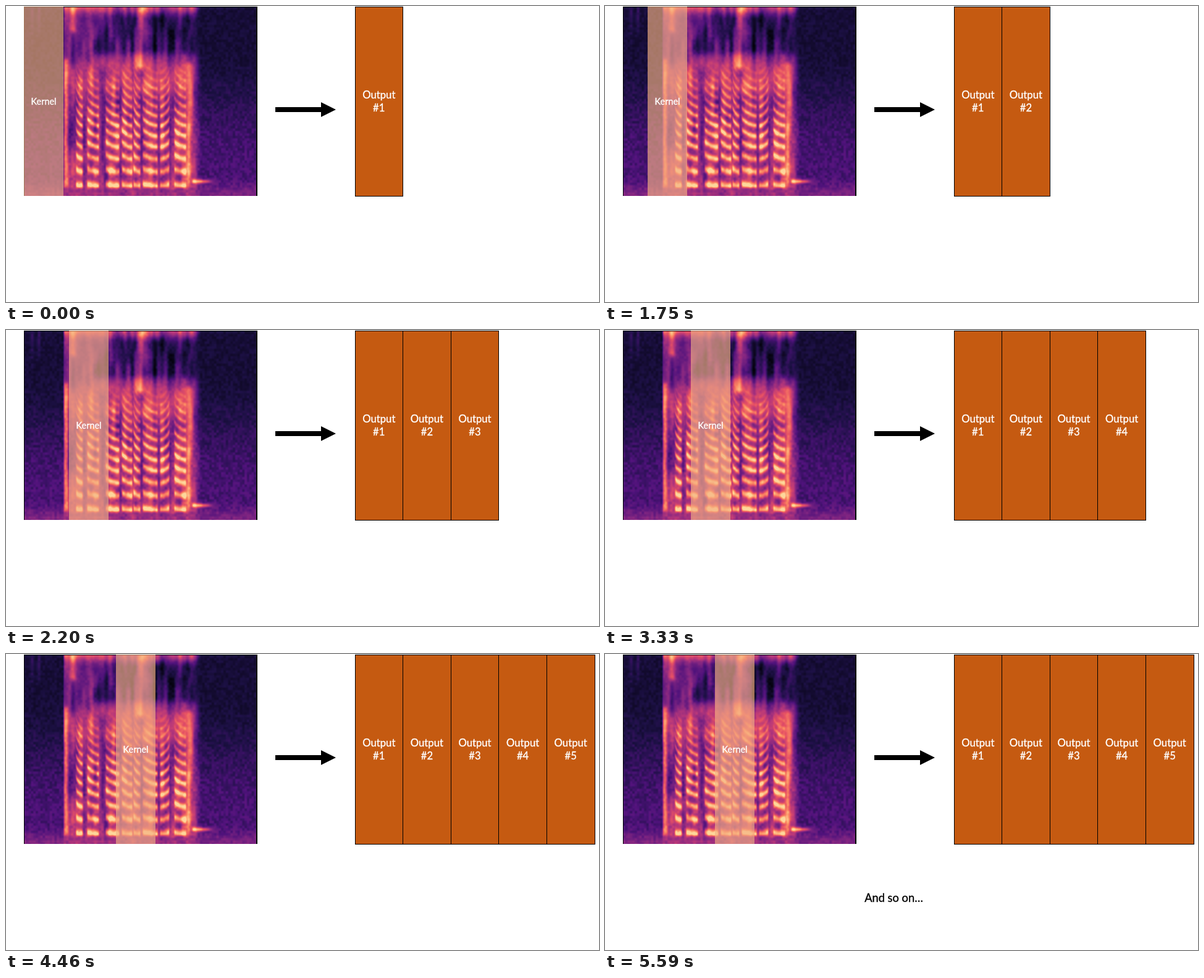
An HTML page with a canvas that plays this animation: 960x480 px, repeating every 6.72 s.

```html
<!DOCTYPE html>
<html lang="en">
<head>
<meta charset="utf-8">
<title>Sliding kernel</title>
<style>
html, body { margin: 0; width: 100%; height: 100%; overflow: hidden; background: #fff; }
canvas { display: block; }
</style>
</head>
<body>
<canvas id="stage" width="960" height="480"></canvas>
<script>
const ctx = document.getElementById('stage').getContext('2d');
const STEP_MS = 1130, FIRST_MS = 1070, LOOP = FIRST_MS + 5 * STEP_MS;
const KERNEL_X = [29, 69, 102, 139, 178];
const BOX = { x: 565, y: 1, h: 308, step: 77.6 };
const SPEC = { x: 29, y: 1, w: 378, h: 307 };

const clamp = v => Math.max(0, Math.min(1, v));
const smooth = (a, b, v) => { const t = clamp((v - a) / (b - a)); return t * t * (3 - 2 * t); };
const bump = (v, mid, size) => Math.exp(-(((v - mid) / size) ** 2));
const band = (a, b, soft, v) => smooth(a - soft, a + soft, v) * (1 - smooth(b - soft, b + soft, v));

function hash(x, y, seed) {
  let n = Math.imul(x, 374761393) + Math.imul(y, 668265263) + Math.imul(seed, 974634721);
  n = Math.imul(n ^ (n >>> 13), 1274126177);
  return ((n ^ (n >>> 16)) >>> 0) / 4294967296;
}

// Smooth value noise in -1..1, with cells of cw by ch pixels
function noise(x, y, cw, ch, seed) {
  const gx = x / cw, gy = y / ch, ix = Math.floor(gx), iy = Math.floor(gy);
  const fx = smooth(0, 1, gx - ix), fy = smooth(0, 1, gy - iy);
  const row = j => hash(ix, j, seed) * (1 - fx) + hash(ix + 1, j, seed) * fx;
  return (row(iy) * (1 - fy) + row(iy + 1) * fy) * 2 - 1;
}

const MAGMA = ['000004', '1c1044', '4f127b', '812581', 'b5367a', 'e55064', 'fb8761', 'fec287', 'fcfdbf']
  .map(hex => [0, 2, 4].map(i => parseInt(hex.slice(i, i + 2), 16)));

function magma(v) {
  const p = clamp(v) * 8, i = Math.min(7, Math.floor(p)), f = p - i;
  return MAGMA[i].map((c, k) => c + (MAGMA[i + 1][k] - c) * f);
}

// Left and right ends of the voiced syllables
const SYLLABLES = [[113, 124], [131, 150], [161, 183], [187, 204], [206, 217], [221, 245], [249, 264], [272, 291]];

function background(x, y) {
  return 0.1 + 0.13 * smooth(70, 260, y) + 0.13 * smooth(275, 308, y)
    + noise(x, y, 3.8, 4, 1) * (0.03 + 0.025 * smooth(60, 230, y))
    + 0.07 * (bump(x, 42, 3) + bump(x, 53, 3)) * (1 - smooth(10, 70, y));
}

// Broad energy of the spoken part: columns, clouds and four strong onsets
function speech(x, y) {
  const streak = (mid, w, top, end, k) => k * bump(x, mid, w) * band(top, end, 6, y);
  return 0.2 + 0.12 * noise(x, y, 6, 70, 2) + 0.09 * noise(x, y, 9, 22, 3)
    + 0.22 * bump(y, 2, 9) + 0.17 * band(84, 140, 16, y)
    - 0.15 * smooth(110, 230, x) * band(14, 76, 9, y)
    + streak(97, 4, 85, 291, 0.25) + streak(108, 5, 0, 42, 0.32)
    + streak(218, 7, 0, 102, 0.36) + streak(296, 5, 92, 291, 0.27);
}

// Harmonic lines: wide apart at the bottom, closer towards the top
function harmonics(x, y) {
  const up = 291 - y;
  const order = 1 + up / 24.5 + 0.0001 * up * up;
  const fade = smooth(80, 130, y) * (1 - smooth(291, 298, y));
  return SYLLABLES.reduce((sum, [a, b]) => {
    const t = (x - a) / (b - a);
    const fall = 0.12 - 0.24 * bump(a, 249, 12);
    const pitch = 1.02 + fall * (0.5 - t) + 0.1 * (t - 0.5) ** 2;
    const ridge = (0.5 + 0.5 * Math.cos(2 * Math.PI * order / pitch)) ** 1.5;
    return sum + band(a, b, 2, x) * (0.05 + (0.12 + 0.28 * smooth(110, 200, y)) * ridge);
  }, 0) * fade;
}

function level(x, y) {
  const voice = smooth(91, 95, x) * (1 - smooth(300, 318, x)) * (1 - 0.55 * smooth(291, 300, y));
  const tail = 0.55 * bump(y, 284, 3.5) * smooth(298, 304, x) * (1 - smooth(306, 344, x));
  return Math.min(0.92, background(x, y) + voice * speech(x, y) + harmonics(x, y) + tail);
}

function makeSpectrogram() {
  const pic = document.createElement('canvas');
  pic.width = SPEC.w;
  pic.height = SPEC.h;
  const g = pic.getContext('2d');
  const img = g.createImageData(SPEC.w, SPEC.h);
  for (let y = 0, i = 0; y < SPEC.h; y++) {
    for (let x = 0; x < SPEC.w; x++, i += 4) {
      const edge = x < 1 || x >= SPEC.w - 2 || y < 1;
      img.data.set(magma(edge ? 0 : level(x + SPEC.x, y + SPEC.y)), i);
      img.data[i + 3] = 255;
    }
  }
  g.putImageData(img, 0, 0);
  return pic;
}

function label(text, x, y, size, color = '#fff') {
  ctx.font = `${size}px Lato, sans-serif`;
  ctx.textAlign = 'center';
  ctx.fillStyle = ctx.strokeStyle = color;
  ctx.lineWidth = 0.35;
  ctx.fillText(text, x, y);
  ctx.strokeText(text, x, y);
}

function drawArrow() {
  ctx.fillStyle = '#000';
  ctx.fillRect(436, 164, 75, 8);
  ctx.beginPath();
  ctx.moveTo(510, 156);
  ctx.lineTo(534, 168);
  ctx.lineTo(510, 180);
  ctx.fill();
}

function drawOutput(i) {
  const left = Math.floor(BOX.x + i * BOX.step);
  const right = Math.floor(BOX.x + (i + 1) * BOX.step);
  ctx.fillStyle = '#c55a11';
  ctx.fillRect(left, BOX.y, right - left + 1, BOX.h);
  ctx.strokeStyle = '#000';
  ctx.lineWidth = 1;
  ctx.strokeRect(left + 0.5, BOX.y + 0.5, right - left, BOX.h - 1);
  const mid = BOX.x + (i + 0.5) * BOX.step;
  label('Output', mid, 150, 16.7);
  label('#' + (i + 1), mid, 171, 16.7);
}

const spectrogram = makeSpectrogram();

function draw(time) {
  const step = Math.floor((time - FIRST_MS) / STEP_MS) + 1;
  const last = KERNEL_X.length - 1;
  const pos = Math.min(step, last);
  ctx.fillStyle = '#fff';
  ctx.fillRect(0, 0, 960, 480);
  ctx.drawImage(spectrogram, SPEC.x, SPEC.y);
  ctx.fillStyle = 'rgba(244, 177, 131, 0.65)';
  ctx.fillRect(KERNEL_X[pos], SPEC.y, 64, SPEC.h);
  label('Kernel', KERNEL_X[pos] + 32, 160, 14.4);
  drawArrow();
  for (let i = 0; i <= pos; i++) drawOutput(i);
  if (step > last) label('And so on…', 467.5, 402, 18.3, '#000');
}

const start = performance.now();
function tick() {
  draw((performance.now() - start) % LOOP);
  requestAnimationFrame(tick);
}
tick();
</script>
</body>
</html>
```
